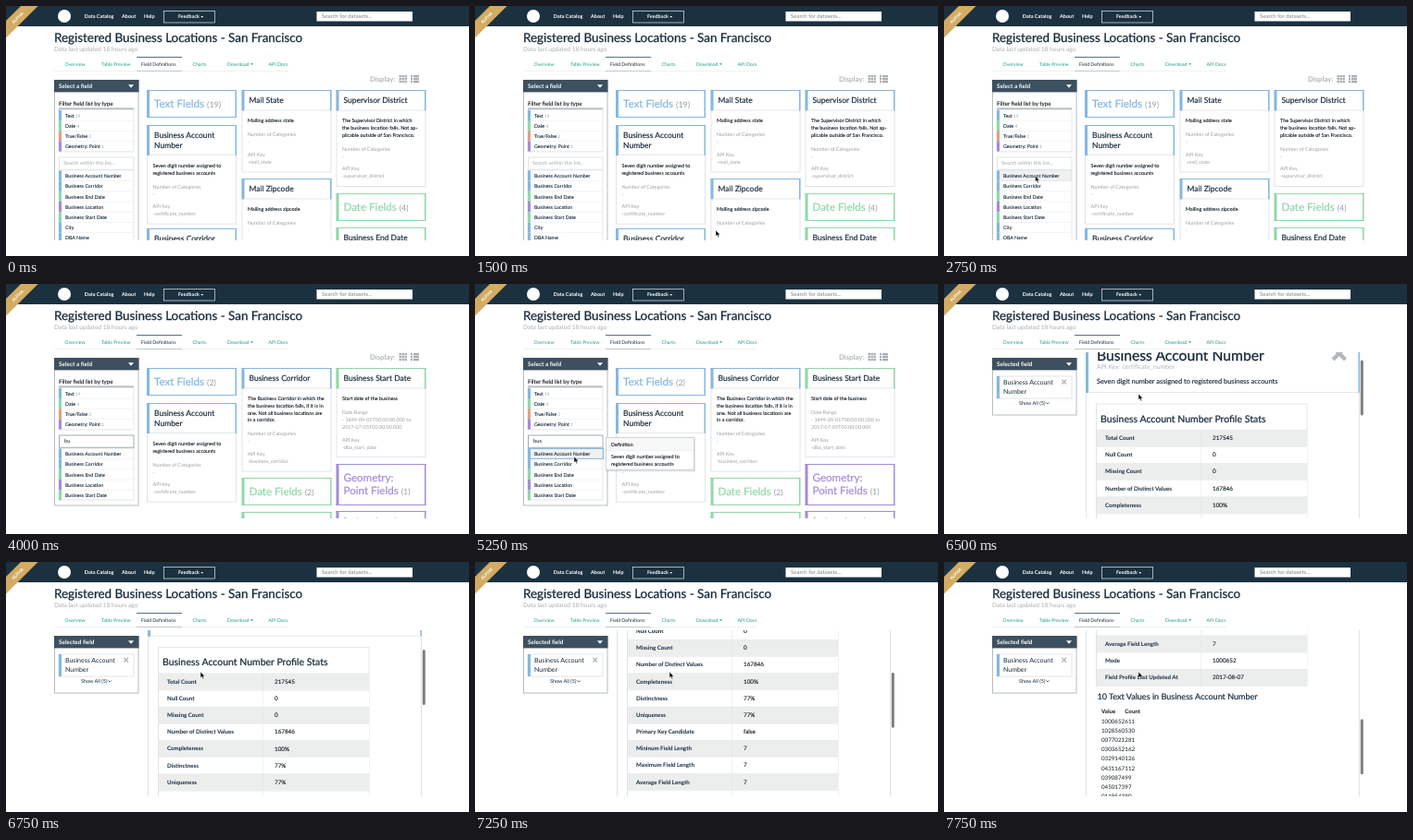
An HTML page for the animation above (8000 ms loop, 500 by 271 pixels).

```html
<!DOCTYPE html>
<html lang="en">
<head>
<meta charset="utf-8">
<title>Data catalog</title>
<style>
html, body { margin: 0; width: 100%; height: 100%; overflow: hidden; background: #fff; }
svg { display: block; width: 500px; height: 271px; }
text { font-family: Lato, "Open Sans", sans-serif; text-rendering: geometricPrecision; white-space: pre; }
</style>
</head>
<body>
<svg id="stage" viewBox="0 0 500 271" xmlns="http://www.w3.org/2000/svg"></svg>
<script>
const INK = '#111a20', NAVY = '#15293a', GREY = '#999fa3', LINE = '#d9dee1', BAR = '#1c313f', HEAD = '#3d505f';
const BLUE = '#85b8de', GREEN = '#90d8a8', ORANGE = '#e0a183', PURPLE = '#a48cd9', TEAL = '#1a9f85';

const rect = (x, y, w, h, fill, stroke = 'none', sw = 1) =>
  `<rect x="${x}" y="${y}" width="${w}" height="${h}" fill="${fill}" stroke="${stroke}" stroke-width="${sw}"/>`;
const path = (d, fill, extra = '') => `<path d="${d}" fill="${fill}" ${extra}/>`;
// y is the middle of the line
const text = (x, y, size, str, fill = INK, weight = 400, extra = '') =>
  `<text x="${x}" y="${(y + size * .34).toFixed(2)}" font-size="${size}" fill="${fill}" font-weight="${weight}" ${extra}>${str}</text>`;
// regular letters made slightly heavier with a thin outline
const medium = (x, y, size, str, fill = INK) =>
  text(x, y, size, str, fill, 400, `stroke="${fill}" stroke-width="${(size * .02).toFixed(2)}"`);
const caret = (x, y, w, fill) => path(`M${x} ${y}h${w}l${-w / 2} ${w * .6}z`, fill);
const cross = (x, y, s, w) =>
  path(`M${x} ${y}l${s} ${s}m0 ${-s}l${-s} ${s}`, 'none', `stroke="#b3b7ba" stroke-width="${w}"`);
const group = (id, body, extra = '') => `<g id="${id}" ${extra}>${body}</g>`;
const count = (n, size) => `<tspan font-size="${size}" fill="${GREY}" stroke="none">${n}</tspan>`;

function pageTop() {
  const tabs = [[63.5, 'Overview'], [103, 'Table Preview'], [146, 'Field Definitions', NAVY], [201.5, 'Charts'],
    [239, 'Download'], [283.5, 'API Docs']];
  return rect(0, 0, 500, 22, BAR) +
    path('M16 0H34.6L0 34.6V16z', '#d3ab63') +
    text(0, 0, 4.8, 'ALPHA', '#fff', 700, 'text-anchor="middle" transform="translate(12.6 12.8) rotate(-45)"') +
    '<circle cx="63" cy="11" r="7" fill="#fff"/>' +
    text(84.8, 11.3, 5.5, 'Data Catalog', '#fff', 700) + text(125, 11.3, 5.5, 'About', '#fff', 700) +
    text(149, 11.3, 5.5, 'Help', '#fff', 700) +
    rect(170.5, 5.5, 55, 12.5, 'none', '#dfe5e8', .7) +
    text(186, 11.5, 5.4, 'Feedback', '#fff', 700) + caret(210.4, 11, 2.8, '#fff') +
    rect(335.5, 6, 103.5, 10.5, '#fff') + text(341, 11.2, 6, 'Search for datasets...', '#7b8388') +
    medium(52, 34.2, 13.42, 'Registered Business Locations - San Francisco', NAVY) +
    text(52, 46.8, 6.6, 'Data last updated 18 hours ago', '#a9adb0') +
    rect(52, 70, 253, .6, '#e3ebe9') + rect(141, 55, 49, 1, '#5a7080') + rect(141, 70, 49, .7, '#a9b6bd') +
    tabs.map(([x, s, c = TEAL]) => text(x, 63, 5.2, s, c)).join('') + caret(264, 62.3, 3, TEAL);
}

function displayIcons() {
  let s = text(393, 79.5, 7.7, 'Display:', '#b0b5b8', 700);
  for (let r = 0; r < 3; r++) {
    for (let c = 0; c < 3; c++) s += rect(424.5 + c * 3, 75 + r * 3, 2.4, 2.3, '#a8aeb2');
    s += rect(437, 75 + r * 3, 2, 2.3, '#a8aeb2') + rect(440, 75 + r * 3, 6, 2.3, '#a8aeb2');
  }
  return s;
}

const sideFrame = (label, h) => rect(52.5, 80.5, 90.5, h, '#fff', '#b4bdc4') +
  rect(52, 80, 91.5, 13.4, HEAD) + text(57, 87.2, 6.4, label, '#fff', 700) + caret(132, 85.2, 6, '#fff');

function fieldRow(y, color, label, extra = '') {
  return rect(57, y, 3, 11.2, color) + rect(60, y + 11, 78, .5, '#e6e9eb') +
    medium(64, y + 6, 5.25, label + extra, NAVY);
}

const FIELDS = [[BLUE, 'Business Account Number'], [BLUE, 'Business Corridor'], [GREEN, 'Business End Date'],
  [PURPLE, 'Business Location'], [GREEN, 'Business Start Date'], [BLUE, 'City'], [BLUE, 'DBA Name']];

function sidebar(n, h) {
  const types = [[BLUE, 'Text', 19], [GREEN, 'Date', 4], [ORANGE, 'True/False', 2], [PURPLE, 'Geometry: Point', 1]];
  return sideFrame('Select a field', h) + medium(57, 105.8, 6.2, 'Filter field list by type') +
    rect(57, 112.5, 81, 45.5, '#fff', LINE, .7) + rect(57, 110.7, 81, .8, '#6d7880') +
    types.map(([c, s, k], i) => fieldRow(112.8 + i * 11.2, c, s, ' ' + count(k, 4.7))).join('') +
    rect(57, 178, 81, n * 11.2, '#fff', LINE, .7) +
    FIELDS.slice(0, n).map(([c, s], i) => fieldRow(178.4 + i * 11.2, c, s)).join('');
}

// top line and side bars of a panel
const trim = (x, y, w, h, color) => rect(x, y, w, 1, color) + rect(x, y, 3, h, color) + rect(x + w - 1.5, y, 1.5, h, color);

function heading(x, y, color, lines, n) {
  const h = lines.length > 1 ? 45 : 30;
  return trim(x, y, 97, h, color) + rect(x, y + h - 1, 97, 1, color) + lines.map((s, i) =>
    medium(x + 8, y + 15 + i * 14, 11.6, s + (i == lines.length - 1 ? ' ' + count(`(${n})`, 8.9) : ''), color)).join('');
}

function card(x, y, color, title, body, key, label = 'Number of Categories', values = ['-']) {
  const th = 12 + title.length * 10.5, bx = x + 6.5;
  let s = '', cy = y + th + 11;
  const line = (str, fill, step, draw = text) => { s += draw(bx, cy, 5.42, str, fill); cy += step; };
  body.forEach((str, i) => line(str, INK, i < body.length - 1 ? 7.7 : 15, medium));
  line(label, GREY, 8);
  values.forEach((v, i) => line(v, GREY, i < values.length - 1 ? 7.7 : 13.5));
  line('API Key', GREY, 8);
  line('-' + key, GREY, 10.5);
  return rect(x + .5, y + .5, 96, cy - y, '#fff', LINE, .8) + trim(x, y, 97, th, color) +
    rect(x + 3, y + th - 1, 92.5, 1, '#e3e8eb') +
    title.map((t, i) => medium(x + 8, y + 11.6 + i * 10.5, 8.5, t, NAVY)).join('') + s;
}

const accountCard = () => card(152, 129, BLUE, ['Business Account', 'Number'],
  ['Seven digit number assigned to', 'registered business accounts'], 'certificate_number');

const corridor = (x, y) => card(x, y, BLUE, ['Business Corridor'], ['The Business Corridor in which the',
  'the business location falls, if it is in', 'one. Not all business locations are', 'in a corridor.'], 'business_corridor');

const endDate = (x, y) => card(x, y, GREEN, ['Business End Date'], ['End date of the business'], 'dba_end_date');

const allCards = () => heading(152, 91, BLUE, ['Text Fields'], 19) + accountCard() + corridor(152, 241) +
  card(254.5, 91, BLUE, ['Mail State'], ['Mailing address state'], 'mail_state') +
  card(254.5, 187, BLUE, ['Mail Zipcode'], ['Mailing address zipcode'], 'mail_zipcode') +
  card(356.5, 91, BLUE, ['Supervisor District'], ['The Supervisor District in which',
    'the business location falls. Not ap-', 'plicable outside of San Francisco.'], 'supervisor_district') +
  heading(356.5, 203, GREEN, ['Date Fields'], 4) + endDate(356.5, 240);

const foundCards = () => heading(152, 91, BLUE, ['Text Fields'], 2) + accountCard() +
  corridor(254.5, 91) + heading(254.5, 210, GREEN, ['Date Fields'], 2) + endDate(254.5, 247) +
  card(356.5, 91, GREEN, ['Business Start Date'], ['Start date of the business'], 'dba_start_date',
    'Date Range', ['- 1849-09-01T00:00:00.000 to', '2017-07-05T00:00:00.000']) +
  heading(356.5, 195, PURPLE, ['Geometry:', 'Point Fields'], 1) +
  card(356.5, 246, PURPLE, ['Business Location'], ['Location of the business'], 'location');

const tooltip = () => rect(57.5, 178.4, 81, 11, 'none', BLUE) +
  rect(142, 167.5, 96, 36, 'rgba(0,0,0,.1)') +
  rect(141.5, 166.5, 95, 35, '#fff', '#c5cacd', .8) + rect(142, 167, 94, 13.5, '#f8f8f8') +
  rect(142, 180.5, 94, .6, '#e2e5e7') + medium(147, 174.2, 5.4, 'Definition') +
  medium(147, 187.3, 5.42, 'Seven digit number assigned to') + medium(147, 195, 5.42, 'registered business accounts');

const selected = () => sideFrame('Selected field', 61.5) + rect(57, 100, 81, 24, '#fff', LINE, .8) +
  rect(57, 100, 3, 24, BLUE) + text(64, 107, 7, 'Business Account', NAVY) + text(64, 117, 7, 'Number', NAVY) +
  cross(127.4, 103.8, 4.6, 1.4) + text(81, 129.3, 5.5, 'Show All (5)', NAVY) +
  path('M110.4 128.4l1.7 1.7l1.7-1.7', 'none', `stroke="${NAVY}" stroke-width=".7"`);

function detail() {
  const stats = [['Total Count', '217545'], ['Null Count', '0'], ['Missing Count', '0'], ['Number of Distinct Values', '167846'],
    ['Completeness', '100%'], ['Distinctness', '77%'], ['Uniqueness', '77%'], ['Primary Key Candidate', 'false'],
    ['Mininum Field Length', '7'], ['Maximum Field Length', '7'], ['Average Field Length', '7'],
    ['Mode', '1000652'], ['Field Profile Last Updated At', '2017-08-07']];
  const top = ['1000652 611', '1028560 530', '0077021 281', '0303652 162', '0329140 126', '0431167 112',
    '0390874 99', '0450173 97', '0119543 90'];
  const rowH = 18.17;
  let s = rect(153.5, 80.5, 295, 520, '#fff', LINE, .8) + trim(153, 80, 296, 60, BLUE) +
    rect(156, 139, 291.5, 1, '#e3e8eb') +
    medium(165, 100, 15.7, 'Business Account Number', NAVY) +
    text(165, 112, 6.9, 'API Key: certificate_number', '#b0b4b7') +
    medium(165, 127.3, 7.4, 'Seven digit number assigned to registered business accounts', NAVY) +
    cross(420, 90.5, 13.5, 4.2) +
    rect(164.5, 152, 227.5, 264.2, '#fff', LINE, .8) +
    medium(169, 168, 10.5, 'Business Account Number Profile Stats', NAVY);
  stats.forEach(([k, v], i) => {
    const y = 180 + i * rowH;
    s += rect(165, y, 227, rowH, i % 2 ? '#fff' : '#eceeee') + rect(165, y, 227, .5, '#e0e3e4') +
      text(174, y + 9, 6.2, k, NAVY, 700) + medium(290, y + 9, 6.3, v);
  });
  s += rect(277, 180, .5, stats.length * rowH, '#e0e3e4') +
    medium(165.5, 428, 9.05, '10 Text Values in Business Account Number', NAVY) +
    text(170, 444.3, 6.2, 'Value', INK, 700) + text(195.3, 444.3, 6.2, 'Count', INK, 700);
  top.forEach((r, i) => {
    const [v, n] = r.split(' '), y = 454.6 + i * 10.17;
    s += text(170, y, 6.2, v) + text(195.3, y, 6.2, n);
  });
  return s;
}

const box = stroke => rect(57.5, 164, 80.5, 13.2, '#fff', stroke, .8);

document.getElementById('stage').innerHTML =
  `<defs><clipPath id="page"><rect y="74" width="500" height="180"/></clipPath></defs>` +
  rect(0, 0, 500, 271, '#fff') + pageTop() +
  `<g clip-path="url(#page)">` +
    group('icons', displayIcons()) +
    group('all', sidebar(7, 190) + allCards()) +
    group('found', sidebar(5, 159.5) + foundCards()) +
    group('idleBox', box(LINE) + text(62, 170.5, 5.6, 'Search within this list...', '#a5aaae')) +
    group('liveBox', box('#8a979f') + text(63, 170.5, 5.8, '', INK, 400, 'id="query"')) +
    group('hover', rect(60, 0, 78, 11.2, '#000'), 'opacity=".06"') +
    group('tip', tooltip()) +
    group('detail', group('scroll', detail()) + selected()) +
    group('thumb', '<rect x="449.8" width="3" height="60" rx="1.5" fill="#7c7f81"/>') +
  `</g>` +
  group('mouse', path('M0 0V6.6L1.5 5.3L2.6 7.7L3.7 7.2L2.7 4.9H4.7z', '#000', 'stroke="#fff" stroke-width=".5"'));

// time, view, mouse position, then options
const STEPS = [
  [0, 'all', null],
  [500, 'all', [217, 143]],
  [1000, 'all', [300, 117]],
  [1250, 'all', [399, 170]],
  [1500, 'all', [260, 243]],
  [1750, 'all', [150, 212]],
  [2000, 'all', [80, 184], { row: 0 }],
  [2250, 'all', [87, 184], { row: 0 }],
  [2500, 'all', [94, 184], { row: 0 }],
  [2750, 'all', [98.5, 184], { row: 0 }],
  [3250, 'all', [95, 174]],
  [3500, 'all', [90, 169], { query: '' }],
  [4000, 'found', null, { query: 'bu' }],
  [4250, 'found', null, { query: 'bus' }],
  [4750, 'found', [98, 180], { query: 'bus', row: 0 }],
  [5000, 'found', [104, 185], { query: 'bus', row: 0, tip: 1 }],
  [5250, 'found', [107, 187], { query: 'bus', row: 0, tip: 1 }],
  [5500, 'detail', [112, 183]],
  [5750, 'detail', [190, 126.5]],
  [6000, 'detail', [210, 119]],
  [6500, 'detail', [210, 119], { scroll: 22 }],
  [6750, 'detail', [210, 119], { scroll: 59.3 }],
  [7000, 'detail', [210, 119], { scroll: 96 }],
  [7250, 'detail', [210, 119], { scroll: 132.2 }],
  [7500, 'detail', [210, 119], { scroll: 207 }],
  [7750, 'detail', [210, 119], { scroll: 282 }]
];

const el = id => document.getElementById(id);
const show = (id, on) => el(id).style.display = on ? '' : 'none';
const move = (id, x, y) => el(id).setAttribute('transform', `translate(${x} ${y})`);
let last;

function draw(step) {
  const [, view, mouse, { row, query, tip, scroll } = {}] = step;
  const live = query !== undefined;
  for (const v of ['all', 'found', 'detail']) show(v, v === view);
  show('icons', view !== 'detail');
  show('idleBox', view !== 'detail' && !live);
  show('liveBox', live);
  el('query').textContent = query || '';
  show('hover', row !== undefined);
  move('hover', 0, 178.4 + (row || 0) * 11.2);
  show('tip', tip);
  move('scroll', 0, -(scroll || 0));
  show('thumb', scroll);
  move('thumb', 0, 75 + (scroll || 0) * .338);
  show('mouse', mouse);
  if (mouse) move('mouse', ...mouse);
}

function tick() {
  const t = performance.now() % 8000;
  const step = STEPS.findLast(s => s[0] <= t);
  if (step !== last) draw(last = step);
  requestAnimationFrame(tick);
}
tick();
</script>
</body>
</html>
```
